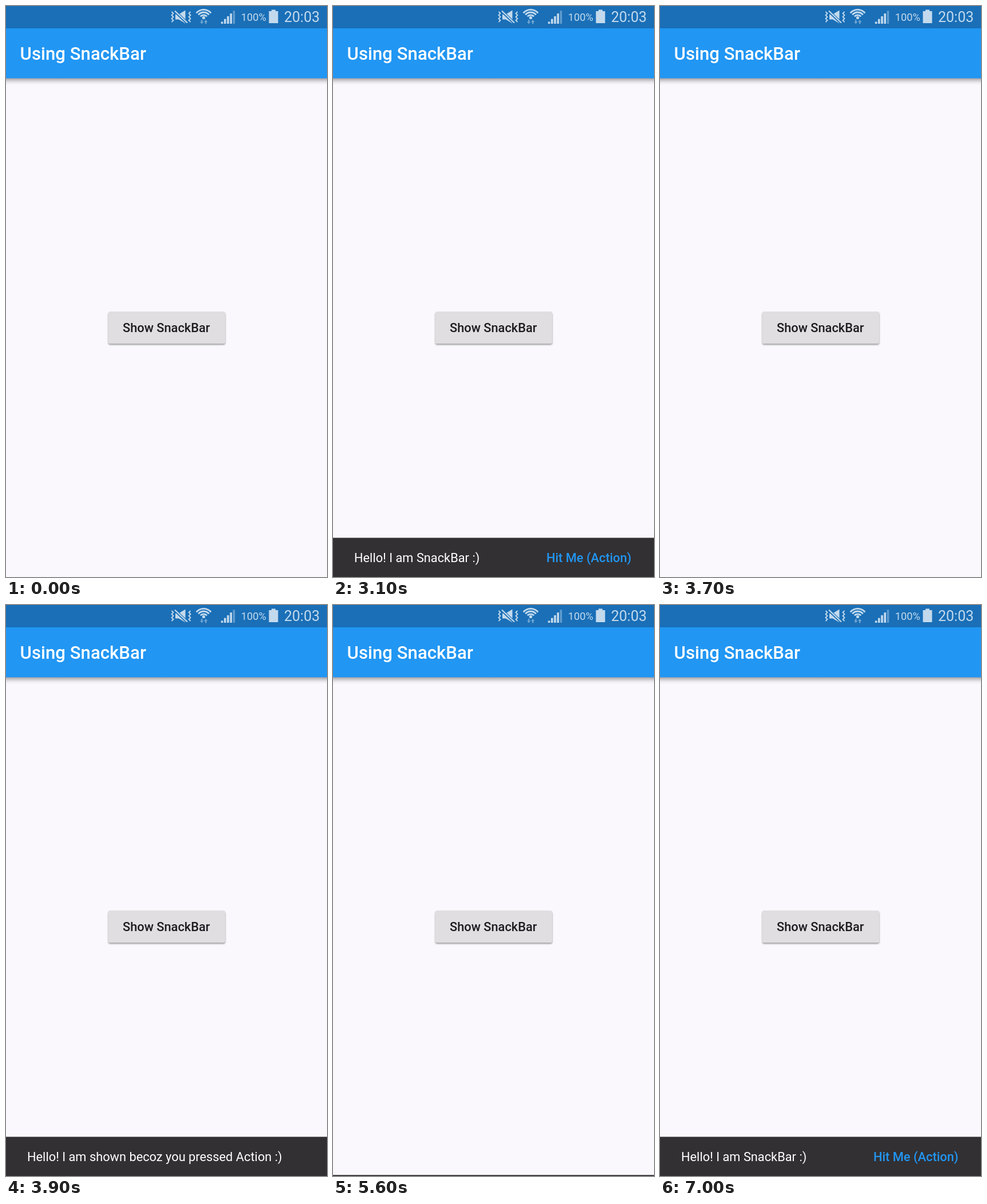
Write an HTML page that moves like this. It is 561 px wide and 998 px high and loops after 8000 ms.

```html
<!DOCTYPE html>
<html lang="en">
<head>
<meta charset="utf-8">
<title>Using SnackBar</title>
<style>
  html, body { margin: 0; width: 100%; height: 100%; overflow: hidden; background: #faf8fc; }
  svg { display: block; width: 100%; height: 100%; }
  text { font-family: Roboto, Arial, sans-serif; font-size: 21.8px; white-space: pre; }
  .medium { font-weight: 500; }
  .status text { fill: #c3daed; }
</style>
</head>
<body>
<svg viewBox="0 0 561 998">
  <defs>
    <linearGradient id="barShade" x1="0" y1="0" x2="0" y2="1">
      <stop offset="0" stop-color="#000" stop-opacity=".36"/>
      <stop offset=".3" stop-color="#000" stop-opacity=".2"/>
      <stop offset=".65" stop-color="#000" stop-opacity=".06"/>
      <stop offset="1" stop-color="#000" stop-opacity="0"/>
    </linearGradient>
    <filter id="blur" x="-10%" y="-20%" width="120%" height="140%">
      <feGaussianBlur stdDeviation="1.5"/>
    </filter>
  </defs>

  <rect width="561" height="998" fill="#faf8fc"/>
  <rect y="126" width="561" height="12" fill="url(#barShade)"/>
  <rect y="38" width="561" height="88.3" fill="#2196f3"/>
  <rect width="561" height="39" fill="#1a6fb7"/>
  <text class="medium" x="24.6" y="93.7" style="font-size:31.17px" fill="#fff">Using SnackBar</text>

  <g class="status" fill="#c3daed">
    <!-- muted speaker with vibration marks -->
    <g fill="none" stroke="#c3daed" stroke-width="1.8">
      <path d="M289.5 10l3 3-3 3 3 3-3 3 3 3-3 3"/>
      <path d="M322.5 10l-3 3 3 3-3 3 3 3-3 3 3 3"/>
    </g>
    <path d="M296 14.5h6l11.5-7v23l-11.5-7h-6z"/>
    <path d="M295 9l22 21" stroke="#1a6fb7" stroke-width="5"/>
    <path d="M295 8.5l22 21" stroke="#c3daed" stroke-width="2.2"/>
    <!-- wifi -->
    <g id="wifi" fill="none" stroke="#c3daed" stroke-width="2.8"></g>
    <circle cx="345.5" cy="20.5" r="2.6"/>
    <g opacity=".5">
      <path d="M341 24h2.4v3.5h2l-3.2 4-3.2-4h2z"/>
      <path d="M348 31.5h2.4V28h2l-3.2-4-3.2 4h2z"/>
    </g>
    <g id="signal"></g>
    <text x="410.7" y="26" style="font-size:18.3px">100%</text>
    <path d="M464 9V6.5h7V9h4.5v21h-16V9z"/>
    <text x="486" y="28" style="font-size:25px">20:03</text>
  </g>

  <rect x="179" y="536.5" width="204" height="55.5" rx="3" fill="#000" opacity=".42" filter="url(#blur)"/>
  <rect x="178.7" y="534" width="204.3" height="56.3" rx="3" fill="#e0dee1"/>
  <text class="medium" x="204" y="570" fill="#1d1b20">Show SnackBar</text>

  <g id="snack">
    <rect width="561" height="70" fill="#323033"/>
    <g id="content">
      <text id="message" x="37" y="42.3" fill="#fff"></text>
      <text id="action" class="medium" x="373" y="42.3" fill="#2196f3">Hit Me (Action)</text>
    </g>
  </g>
</svg>
<script>
const LOOP = 8000, STEP = 100, STAGE = 998, BAR = 68.5;
const byId = id => document.getElementById(id);
const snack = byId('snack'), content = byId('content');
const message = byId('message'), action = byId('action');

const HELLO = 'Hello! I am SnackBar :)';
const PRESSED = 'Hello! I am shown becoz you pressed Action :)';

// enter and exit: [start, duration]; a zero duration is a hard cut
const bars = [
  { text: HELLO, action: true, enter: [1100, 0], exit: [3375, 250] },
  { text: PRESSED, action: false, enter: [3700, 200], exit: [5375, 250] },
  { text: HELLO, action: true, enter: [6675, 250], exit: [LOOP, 0] }
];

function add(parent, tag, attrs) {
  const el = document.createElementNS('http://www.w3.org/2000/svg', tag);
  for (const k in attrs) el.setAttribute(k, attrs[k]);
  return parent.appendChild(el);
}

const arcs = [7.2, 12, 16.6].map(r => {
  const dx = r * Math.sin(0.88), y = 23 - r * Math.cos(0.88);
  return add(byId('wifi'), 'path', { d: `M${345.5 - dx} ${y}A${r} ${r} 0 0 1 ${345.5 + dx} ${y}` });
});
for (let i = 0; i < 5; i++) {
  const h = 3.5 + i * 4.8;
  add(byId('signal'), 'rect', {
    x: 375.8 + i * 5.2, y: 31 - h, width: 3.6, height: h, opacity: i < 4 ? 1 : 0.42
  });
}

const clamp = v => Math.min(1, Math.max(0, v));
const progress = (t, [start, span]) => span ? clamp((t - start) / span) : +(t >= start);

// cubic-bezier(0.4, 0, 0.2, 1)
function ease(x) {
  let lo = 0, hi = 1;
  for (let i = 0; i < 24; i++) {
    const u = (lo + hi) / 2, v = 1 - u;
    if (1.2 * v * v * u + 0.6 * v * u * u + u ** 3 < x) lo = u; else hi = u;
  }
  return lo * lo * (3 - 2 * lo);
}

function draw(t) {
  const bar = bars.find(b => t >= b.enter[0] && t < b.exit[0] + b.exit[1]);
  snack.style.display = bar ? '' : 'none';
  if (bar) {
    const shown = progress(t, bar.enter);
    const open = shown * (1 - progress(t, bar.exit));
    snack.setAttribute('transform', `translate(0 ${STAGE - BAR * ease(open)})`);
    content.setAttribute('opacity', ease(clamp((shown - 0.72) / 0.28)));
    message.textContent = bar.text;
    action.style.display = bar.action ? '' : 'none';
  }
  arcs[2].setAttribute('opacity', t >= 5700 && t < 6500 ? 0.42 : 1);
}

const origin = performance.now();
function tick() {
  const t = (performance.now() - origin) % LOOP;
  draw(Math.floor(t / STEP) * STEP);
  requestAnimationFrame(tick);
}
tick();
</script>
</body>
</html>
```
